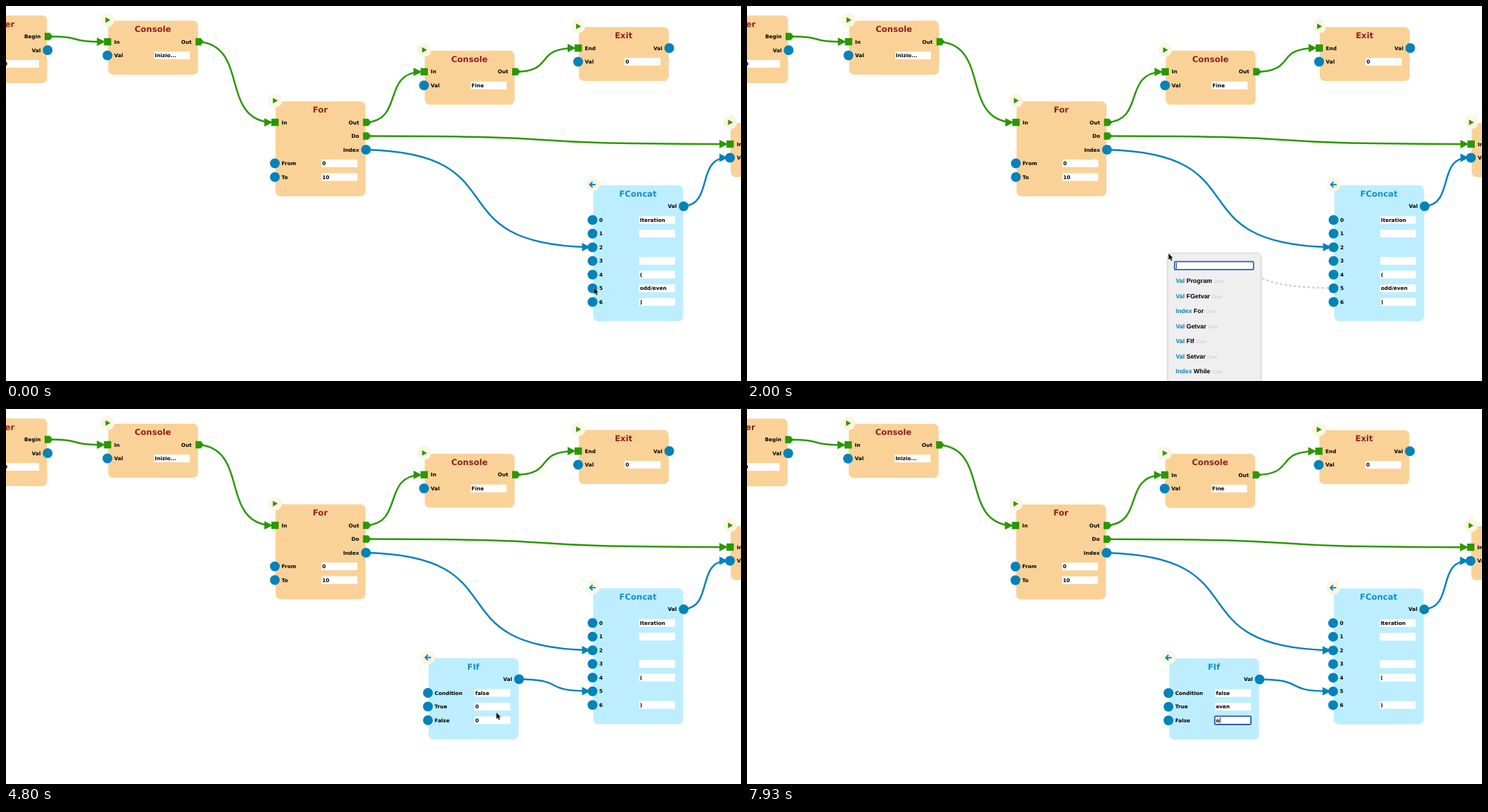
Recreate the animation shown at these times as an HTML page. Size 1047 px wide and 535 px high, loop 8 s.

```html
<!DOCTYPE html>
<html lang="en">
<head>
<meta charset="utf-8">
<title>Node editor</title>
<style>
  html, body { margin: 0; width: 100%; height: 100%; overflow: hidden; background: #fff; }
  svg { display: block; width: 100%; height: 100%; }
  text { font: bold 7.3px "DejaVu Sans", Verdana, sans-serif; text-rendering: geometricPrecision; white-space: pre; }
  .title { font-size: 11.7px; }
  .list text { font: bold 8.9px "Liberation Sans", Arial, sans-serif; }
  .list .query { font-weight: normal; }
  .list .tag { font-size: 6.7px; font-weight: normal; fill: #c4c4c4; }
</style>
</head>
<body>
<svg id="stage" viewBox="0 0 1047 535" xmlns="http://www.w3.org/2000/svg"></svg>
<script>
const LOOP = 8000, TICK = 1000 / 15;
const GREEN = '#2a9800', BLUE = '#0582ba';
const WIDTH = 128, ROW = 19.5, FIELD_X = 65.5, FIELD_W = 51, FIELD_H = 11;
const FLOW = ['In', 'Out', 'End', 'Begin', 'Do'];

const rect = (x, y, w, h, fill, more = '') =>
  `<rect x="${x}" y="${y}" width="${w}" height="${h}" fill="${fill}" ${more}/>`;
const label = (x, y, s, more = '') => `<text x="${x}" y="${y}" ${more}>${s}</text>`;

function inPort(x, y, flow) {
  return flow ? rect(x - 6, y - 5.2, 10.4, 10.4, GREEN)
              : `<circle cx="${x - 1}" cy="${y}" r="7" fill="${BLUE}"/>`;
}

function outPort(x, y, flow) {
  return flow ? `<path d="M${x - 3.5} ${y - 5.2}h7.5l4.3 5.2l-4.3 5.2h-7.5z" fill="${GREEN}"/>`
              : `<circle cx="${x + .8}" cy="${y}" r="7" fill="${BLUE}"/>`;
}

// A row is [input label, field text, output label, id].
function node(x, y, title, rows, blue) {
  const right = x + WIDTH;
  const height = 57.5 + ROW * (rows.length - 1);
  let s = rect(x, y, WIDTH, height, blue ? '#bdeeff' : '#fad297', 'rx="7"');
  s += `<circle cx="${x - .8}" cy="${y - 1}" r="10" fill="#fcf6e3"/>`;
  s += blue
    ? `<path d="M${x + 3.4} ${y - 1}h-8m3.6 -3.8l-3.8 3.8l3.8 3.8" fill="none" stroke="${BLUE}" stroke-width="1.9"/>`
    : `<path d="M${x - 3.8} ${y - 5}l7 4l-7 4z" fill="${GREEN}"/>`;
  s += label(x + 63.7, y + 16, title,
    `class="title" text-anchor="middle" fill="${blue ? '#128fca' : '#91201f'}"`);
  rows.forEach(([input, field, output, id], i) => {
    const cy = y + 30 + ROW * i, base = cy + 2.6;
    if (input) s += inPort(x, cy, FLOW.includes(input)) + label(x + 8.6, base, input);
    if (output) s += outPort(right, cy, FLOW.includes(output)) +
      label(right - 9, base, output, 'text-anchor="end"');
    if (field !== null) {
      s += `<g ${id ? `id="${id}"` : ''}>` +
        rect(x + FIELD_X, cy - 5.5, FIELD_W, FIELD_H, '#fff') +
        label(x + FIELD_X + 1, base, field) + '</g>';
    }
  });
  return s;
}

function curve(x1, y1, x2, y2) {
  const dx = .7 * (x2 - x1), dy = .04 * (y2 - y1);
  return `M${x1} ${y1}C${x1 + dx} ${y1 + dy} ${x2 - dx} ${y2 - dy} ${x2} ${y2}`;
}

// Joins a node's right edge to another node's left edge.
function wire(right, y1, left, y2, color) {
  return `<path d="${curve(right + 1, y1, left - 7, y2)}" fill="none" stroke="${color}" stroke-width="2.5"/>` +
    `<path d="M${left - 16} ${y2 - 6}l12 6l-12 6z" fill="${color}"/>`;
}

const consoleRows = text => [['In', null, 'Out'], ['Val', text]];
const listItem = ([port, name], i) =>
  `<g>${label(610.7, 395.4 + 21.45 * i,
    `<tspan fill="${BLUE}">${port}</tspan> ${name}<tspan class="tag" dx="2.6">Core</tspan>`)}</g>`;

const items = [['Val', 'Program'], ['Val', 'FGetvar'], ['Index', 'For'], ['Val', 'Getvar'],
  ['Val', 'FIf'], ['Val', 'Setvar'], ['Index', 'While']];

const popup = (height, list) =>
  rect(599.5, 352.8, 132.6, height, '#efefef', 'rx="5" stroke="#d2d2d2" filter="url(#soft)"') +
  list.map(listItem).join('');

document.getElementById('stage').innerHTML = `
  <defs><filter id="soft" x="-10%" y="-10%" width="120%" height="120%">
    <feDropShadow dx="0" dy=".5" stdDeviation="1.2" flood-color="#000" flood-opacity=".25"/>
  </filter></defs>
  <g id="scene">
    ${wire(58.5, 43.5, 145.5, 51, GREEN)}
    ${wire(273, 51, 384, 166, GREEN)}
    ${wire(512, 166, 596.5, 94, GREEN)}
    ${wire(724, 94, 816, 60, GREEN)}
    ${wire(512, 185.5, 1032.3, 197, GREEN)}
    ${wire(512, 205, 836.5, 344, BLUE)}
    ${wire(964.5, 285.5, 1032.3, 216.5, BLUE)}
    <path id="loose" fill="none" stroke="#d3d3d3" stroke-width="2.5" stroke-dasharray="3.6 3"/>
    ${node(-69.5, 13.5, '', [[null, null, 'Begin'], [null, null, 'Val'], [null, '0']])}
    ${label(12.3, 30, 'er', 'class="title" text-anchor="end" fill="#91201f"')}
    ${node(145.5, 21, 'Console', consoleRows('Inizio...'))}
    ${node(384, 136, 'For', [['In', null, 'Out'], [null, null, 'Do'], [null, null, 'Index'], ['From', '0'], ['To', '10']])}
    ${node(596.5, 63.8, 'Console', consoleRows('Fine'))}
    ${node(816, 30, 'Exit', [['End', null, 'Val'], ['Val', '0']])}
    ${node(1032.3, 167, '', consoleRows(''))}
    ${node(836.5, 255.7, 'FConcat', [[null, null, 'Val'], ['0', 'Iteration'], ['1', ''], ['2', null],
      ['3', ''], ['4', '('], ['5', 'odd/even', null, 'slot'], ['6', ')']], true)}
    <g id="branch">
      ${wire(730, 385.5, 836.5, 402.5, BLUE)}
      ${node(602, 355.5, 'FIf', [[null, null, 'Val'], ['Condition', 'false'],
        ['True', '0', null, 'yes'], ['False', '0', null, 'no']], true)}
    </g>
    <rect id="mark" height="9" fill="#b3d7ff" style="mix-blend-mode:multiply"/>
    <rect id="ring" x="667" width="51.4" height="11.8" rx="1" fill="none" stroke="#1a41b4" stroke-width="1.6"/>
  </g>
  <g id="popup" class="list">
    <g id="full">${popup(230, items)}</g>
    <g id="found">${popup(54, [['Val', 'FIf']])}</g>
    ${rect(609, 364.6, 112.6, 11.6, '#fff', 'rx="2" stroke="#1c5fc4" stroke-width="1.7"')}
    <text id="query" class="query" x="611" y="373.5"></text>
  </g>
  <rect id="caret" width=".9" height="8.4"/>
  <path id="pointer" d="M0 0V9L2 7.2L3.6 10.6L5.2 9.9L3.7 6.6H6.4Z" fill="#111" stroke="#fff" stroke-width=".8" paint-order="stroke"/>`;

const $ = id => document.getElementById(id);
const show = (id, on) => $(id).style.display = on ? '' : 'none';
const set = (id, attrs) => { for (const k in attrs) $(id).setAttribute(k, attrs[k]); };

const last = (steps, t) => steps.reduce((v, [at, next]) => t >= at ? next : v, '');

function along(path, t) {
  const i = path.findIndex(p => p[0] > t);
  if (i === 0) return path[0].slice(1);
  if (i < 0) return path[path.length - 1].slice(1);
  const [t0, x0, y0] = path[i - 1], [t1, x1, y1] = path[i];
  const k = (t - t0) / (t1 - t0);
  return [x0 + (x1 - x0) * k, y0 + (y1 - y0) * k];
}

const drag = [[0, 837.5, 402], [1133, 676.5, 378.5], [1733, 600.5, 353]];
const move = [[4400, 605, 365], [4600, 656, 402], [4800, 698.5, 433], [4933, 699, 438.5], [5200, 693, 425]];
const query = [[2670, 'f'], [2870, 'fi'], [3000, 'fif']];
const yes = [[0, '0'], [6130, 'e'], [6400, 'ev'], [6500, 'eve'], [6670, 'even']];
const no = [[0, '0'], [7930, 'o']];

function placeCaret(text, y) {
  const x = +text.getAttribute('x') + text.getComputedTextLength();
  set('caret', { x, y });
}

function draw(t) {
  const tick = Math.floor((t + 5) / TICK) * TICK;
  const open = t >= 2000 && t < 3730, built = t >= 3730, editing = t >= 5270;
  const second = t >= 7000;

  // The whole view settles by a fraction of a pixel on the first click.
  set('scene', { transform: editing ? 'translate(-.6 .2)' : '' });

  const [px, py] = along(built ? move : drag, tick);
  show('pointer', t < 2470 || (t >= 4400 && t < 6130));
  set('pointer', { transform: `translate(${px} ${py})` });

  show('loose', t >= 70 && !built);
  const [wx, wy] = along(drag, Math.max(0, tick - (t >= 1800 ? 0 : 20)));
  set('loose', { d: curve(wx + 2, wy + 1.5, 831, 402.3) });

  show('slot', !built);
  show('branch', built);
  show('popup', open);
  show('full', t < 2870);
  show('found', t >= 2870);
  $('query').textContent = last(query, t);

  const yesText = $('yes').lastChild, noText = $('no').lastChild;
  yesText.textContent = last(yes, t);
  noText.textContent = last(no, t);

  const fieldY = second ? 444 : 424.5;
  show('ring', editing);
  set('ring', { y: fieldY - 5.9 });
  show('mark', (t >= 5470 && t < 6130) || (second && t < 7930));
  set('mark', { x: 668.4, y: fieldY - 4.5, width: 5.2 });

  const typing = (t >= 5270 && t < 5470) || (t >= 6130 && !second) || t >= 7930;
  const blink = open && (t < 2470 || (t >= 2670 && t < 3470));
  show('caret', typing || blink);
  if (blink) placeCaret($('query'), 366.3);
  else if (typing) placeCaret(second ? noText : yesText, fieldY - 4.1);
}

const start = performance.now();
function frame() {
  draw((performance.now() - start) % LOOP);
  requestAnimationFrame(frame);
}
frame();
</script>
</body>
</html>
```
